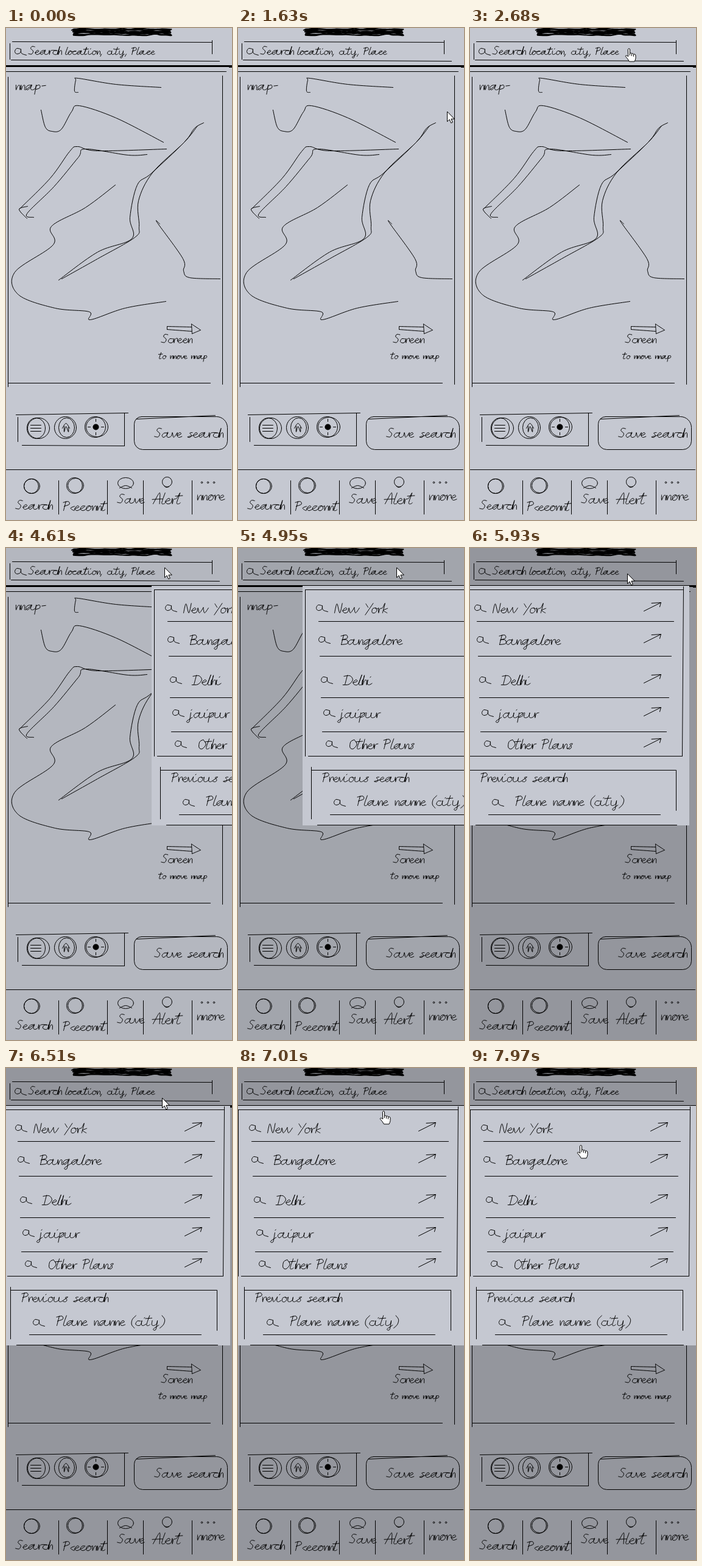
Write an HTML page with a canvas that moves like this. It is 371 px wide and 807 px high and loops after 8 s.

```html
<!DOCTYPE html>
<html lang="en">
<head>
<meta charset="utf-8">
<title>Map search wireframe</title>
<style>
html, body { margin: 0; width: 100%; height: 100%; overflow: hidden; background: #c5c8d1; }
canvas { display: block; }
</style>
</head>
<body>
<canvas id="stage" width="371" height="807"></canvas>
<script>
const ctx = document.getElementById('stage').getContext('2d');
const W = 371, H = 807, LOOP = 8000;
const PAPER = '#c5c8d1';

// Handwriting: a few pen movements, in tenths of the x-height, y upwards.
// Each is [advance, points]; "/" lifts the pen.
const MOVES = {
  bowl: [8, '8,9 3,9 0,4 3,0 8,6 9,10'],
  cup: [8, '0,10 0,2 3,0 7,3'],
  ring: [10, '5,10 1,8 1,1 5,0 8,5 5,10 9,8'],
  curl: [9, '7,9 2,9 0,3 4,0 8,2'],
  eye: [9, '0,4 6,7 4,10 0,5 3,0 8,2'],
  arch: [8, '0,10 1,0 3,8 6,9 7,0'],
  shoulder: [7, '0,10 1,0 2,8 6,10'],
  vee: [8, '0,10 3,0 8,10'],
  ess: [8, '6,10 2,9 5,4 3,0 -1,1'],
  loop: [5, '3,20 0,2 3,0 5,2'],
  hook: [5, '0,10 -1,-8 -5,-7 3,1'],
  stem: [0, '2,19 0,0'],
  leg: [0, '0,10 -1,-9/'],
  belly: [8, '0,8 5,10 6,4 0,1'],
  kick: [8, '/7,9 1,5 7,0'],
  bar: [3, '/-8,14 2,15/'],
  dot: [0, '/-5,15 -4,16/'],
  gate: [10, '/-2,17 6,19 8,13 0,9/'],
  seat: [0, '/-9,10 -2,9 -1,2 -10,0/'],
  sail: [12, '/-3,17 6,18 11,10 6,1 -3,0/'],
  snake: [10, '8,18 3,19 1,14 6,8 4,1 -2,2/'],
  zigzag: [12, '0,0 2,18 8,0 10,19/'],
  fork: [10, '0,18 4,11/11,19 1,-4/'],
  tent: [12, '0,0 6,18 8,18 9,0/-2,8 12,9/'],
  hoop: [12, '6,18 1,14 1,3 6,0 11,9 6,18/'],
  open: [6, '/5,20 0,12 0,2 5,-5/'],
  close: [6, '/1,20 6,12 5,2 0,-5/'],
  comma: [5, '/2,1 0,-5/'],
  dash: [6, '/1,8 7,9/'],
  space: [9, '/']
};

const LETTERS = {
  a: 'bowl cup', c: 'curl', e: 'eye', f: 'loop bar', g: 'bowl hook', h: 'stem arch',
  i: 'cup dot', j: 'hook dot', k: 'stem kick', l: 'loop', m: 'arch arch', n: 'arch',
  o: 'ring', p: 'leg belly', r: 'shoulder', s: 'ess', t: 'loop bar', u: 'cup cup',
  v: 'vee', w: 'vee vee', y: 'cup hook', A: 'tent', B: 'stem gate seat', D: 'stem sail',
  N: 'zigzag', O: 'hoop', P: 'stem gate', R: 'stem gate kick', S: 'snake', Y: 'fork',
  '(': 'open', ')': 'close', ',': 'comma', '-': 'dash', ' ': 'space'
};

const parse = text => text.trim().split(/\s+/).map(p => p.split(',').map(Number));

class Sketch {
  constructor() { this.path = new Path2D(); }

  // Smooth curve through the given points.
  curve(p) {
    const at = i => p[Math.max(0, Math.min(p.length - 1, i))];
    const mid = (i, k, axis) => at(i)[axis] + k * (at(i + 1)[axis] - at(i - 1)[axis]) / 6;
    this.path.moveTo(...p[0]);
    for (let i = 0; i < p.length - 1; i++) {
      this.path.bezierCurveTo(mid(i, 1, 0), mid(i, 1, 1), mid(i + 1, -1, 0), mid(i + 1, -1, 1), ...p[i + 1]);
    }
    return this;
  }

  pen(text, dx = 0, dy = 0) {
    for (const part of text.split('/')) this.curve(parse(part).map(([x, y]) => [x + dx, y + dy]));
    return this;
  }

  write(text, x, y, size) {
    const unit = size / 10, wide = 1.3, slant = .12;
    let points = [], left = x;
    const lift = () => {
      if (points.length > 1) this.curve(points);
      points = [];
    };
    for (const letter of text) {
      for (const name of LETTERS[letter].split(' ')) {
        const [advance, move] = MOVES[name];
        move.split('/').forEach((part, i) => {
          if (i) lift();
          if (!part) return;
          for (const [u, v] of parse(part)) {
            points.push([left + (u * wide + v * slant) * unit, y - v * unit]);
          }
        });
        left += advance * wide * unit;
      }
    }
    lift();
    return this;
  }

  line(x1, y1, x2, y2) {
    this.path.moveTo(x1, y1);
    this.path.lineTo(x2, y2);
    return this;
  }

  ring(x, y, rx, ry = rx) {
    this.path.moveTo(x + rx, y);
    this.path.ellipse(x, y, rx, ry, 0, 0, Math.PI * 2);
    return this;
  }

  box(x, y, w, h, r) {
    this.path.roundRect(x, y, w, h, r);
    return this;
  }

  lens(x, y) { return this.pen('9,1 3,0 0,5 3,9 9,7 10,1 11,8 19,11', x, y); }

  arrow(x, y, w, h) {
    return this.line(x, y + h, x + w, y).line(x + w * .45, y + 1, x + w, y).line(x + w, y, x + w - 2, y + 7);
  }

  draw() {
    ctx.strokeStyle = '#000';
    ctx.lineWidth = 1;
    ctx.stroke(this.path);
  }
}

function drawSearchBar(s) {
  s.line(10, 22, 338, 23).line(338, 20, 338, 42).line(6, 25, 6, 51).line(8, 52, 350, 54);
  s.lens(14, 33).write('Search', 38, 43, 7).write('location, city, Place', 97, 43, 6);
}

function drawMap(s) {
  s.line(0, 71, 361, 71).line(3, 80, 3, 588).line(355, 78, 355, 584).line(3, 582, 335, 582);
  s.write('map-', 15, 101, 8);
  // Top road and river.
  s.pen('118,105 112,103 114,85 118,82 180,92 254,97')
   .pen('57,134 64,162 75,169 90,166 107,137 120,127 180,147 258,187');
  // Forked road with an arrow end.
  s.pen('263,198 150,201 117,194 104,202 72,246 21,297 / 35,292 21,297 34,312')
   .pen('231,207 200,208 130,198 118,212 78,260 34,304 45,310');
  // Both sides of the diagonal road.
  s.pen('324,155 309,164 292,187 238,238 215,257 203,310 206,345 150,367 86,413')
   .pen('314,160 292,187 240,237 217,283 218,325 211,343 150,378 91,411');
  // Lake shore.
  s.pen('179,257 130,294 74,325 77,355 14,400 20,437 80,459 136,465 138,478 195,459 262,448')
   .pen('252,321 248,319 290,378 291,398 301,409 351,411');
  s.pen('304,490 264,489 / 264,489 264,494 / 264,494 304,497 / 304,485 319,495 / 319,495 305,501 / 304,485 305,501');
  s.write('Screen', 256, 516, 7.4).write('to move map', 251, 542, 5.1);
}

function drawTools(s) {
  s.line(16, 634, 200, 631).line(19, 638, 19, 678).line(26, 684, 194, 685).line(194, 631, 194, 685);
  s.ring(49, 656, 15, 17).ring(53, 656, 18, 17)
   .ring(97, 655, 18).ring(99, 655, 13, 16)
   .ring(146, 654, 17).ring(149, 654, 18, 16);
  for (let y = 651; y <= 661; y += 5) s.line(40, y, 57, y);
  s.pen('92,656 98,648 104,656 / 95,653 95,662 98,653 102,662 102,654');
  for (let i = 0; i < 4; i++) {
    const cos = Math.cos(i * Math.PI / 2), sin = Math.sin(i * Math.PI / 2);
    s.line(147 + cos * 9, 654 + sin * 9, 147 + cos * 13, 654 + sin * 13);
  }
  s.box(210, 637, 153, 54, [12, 18, 14, 14]).line(214, 641, 343, 635);
  s.write('Save search', 245, 671, 7.9);
}

function drawNav(s) {
  s.line(0, 724, 369, 724);
  [86, 166, 225, 305].forEach(x => s.line(x, 742, x, 797));
  s.ring(42, 751, 13, 12).ring(41, 751, 12)
   .ring(112, 750, 13).ring(114, 750, 13, 12)
   .ring(196, 746, 13, 9).pen('186,754 196,750 206,754')
   .ring(264, 744, 8).pen('259,750 262,753 267,752');
  for (let x = 321; x <= 341; x += 10) s.ring(x, 745, 1.3);
  s.write('Search', 17, 789, 7.8).write('Reconnf', 94, 791, 7.8).write('Save', 184, 779, 7.8)
   .write('Alert', 241, 780, 9).write('more', 313, 774, 8.5);
}

// Label, its left edge and baseline, and the rule below it.
const ROWS = [
  ['New York', 48, 106, 120], ['Bangalore', 59, 158, 177], ['Delhi', 65, 224, 245],
  ['jaipur', 59, 278, 301], ['Other Plans', 72, 329, 341]
];

function drawResults(s) {
  s.line(0, 68, 361, 68).line(0, 68, 0, 341).line(361, 63, 359, 341);
  ROWS.forEach(([label, x, y, rule], i) => {
    s.write(label, x, y, 8.3).lens(18 + i * 4, y - 13).arrow(296, y - 17, 28, 14);
    s.line(i < 4 ? 22 + i * 2 : 5, rule, i < 4 ? 345 - i * 4 : 359, rule);
  });
  s.line(10, 359, 10, 444).line(10, 364, 349, 364).line(349, 365, 349, 430)
   .line(41, 437, 323, 437).line(20, 454, 350, 454);
  s.write('Previous search', 29, 383, 7.7).lens(47, 412).write('Plane name (city)', 86, 422, 8.2);
}

// Crossed-out title: long strokes back and forth with a shaky hand.
function scribble() {
  let seed = 7;
  const random = () => (seed = seed * 16807 % 2147483647) / 2147483647;
  const s = new Sketch(), points = [];
  for (let pass = 0; pass < 12; pass++) {
    for (let i = 0; i <= 12; i++) {
      const u = pass % 2 ? 1 - i / 12 : i / 12;
      points.push([111 + u * 157 + random() * 4 - 2, pass * .9 + random() * 3 - .5]);
    }
  }
  return s.curve(points).path;
}

const page = new Sketch(), results = new Sketch(), crossedOut = scribble();
[drawSearchBar, drawMap, drawTools, drawNav].forEach(part => part(page));
drawResults(results);

const arrowShape = new Path2D('M0 0V16L3.7 12.6 6.2 18.3 8.8 17.2 6.4 11.7H11.5Z');
const handShape = new Path2D('M5 2.5Q6.5-.5 8 2.5V9Q9.5 7.5 11 9.5 12.5 8.3 14 10.5 17 9.5 17.5 12.5V17Q17 20 15.5 22.5H7Q5 18.5 .8 14 1 11 5 14Z');
const knuckles = new Path2D('M8 9V12M11 10V13M14 11V14');

// Time and place of the pointer tip.
const TRACK = [
  [1430, 364, 166], [2210, 273, 43], [2660, 260, 32], [4950, 260, 32],
  [6500, 256, 49], [7470, 221, 88], [7920, 181, 125]
];

function pointerAt(t) {
  const next = TRACK.findIndex(k => k[0] > t);
  if (next < 1) return TRACK.at(next).slice(1);
  const [t0, x0, y0] = TRACK[next - 1], [t1, x1, y1] = TRACK[next];
  const u = (t - t0) / (t1 - t0);
  return [x0 + (x1 - x0) * u, y0 + (y1 - y0) * u];
}

// Remaining share of the slide: a gentle damped spring from 1 to 0.
function spring(ms) {
  if (ms <= 0) return 1;
  const s = ms / 1000, zeta = .75, omega = 2.95, k = Math.sqrt(1 - zeta * zeta);
  const a = omega * k * s;
  return Math.exp(-zeta * omega * s) * (Math.cos(a) + zeta / k * Math.sin(a));
}

function drawPage() {
  ctx.fillStyle = PAPER;
  ctx.fillRect(0, 0, W, H);
  ctx.save();
  ctx.translate(.5, .5);
  page.draw();
  ctx.lineWidth = 1.8;
  ctx.stroke(crossedOut);
  ctx.restore();
  ctx.fillStyle = '#000';
  ctx.fillRect(0, 61, W, 3);
  ctx.fillRect(366, 61, 5, 4);
  ctx.beginPath();
  ctx.arc(147.5, 654.5, 5, 0, 7);
  ctx.fill();
}

function drawPanel(rest) {
  ctx.fillStyle = `rgba(0,0,0,${.25 * Math.min(1, 1 - rest)})`;
  ctx.fillRect(0, 0, W, H);
  ctx.save();
  ctx.translate(Math.round(375 * rest), 0);
  ctx.fillStyle = PAPER;
  ctx.fillRect(-4, 62, 375, 393);
  ctx.translate(.5, .5);
  results.draw();
  ctx.restore();
}

function drawPointer(t, time) {
  const [x, y] = pointerAt(t);
  const hand = time < 4230 ? y < 57 : y > 62;
  const shape = hand ? handShape : arrowShape;
  ctx.save();
  ctx.translate(Math.round(hand ? x - 6 : x) + .5, Math.round(y) + .5);
  ctx.lineWidth = 1;
  ctx.fillStyle = '#fff';
  ctx.fill(shape);
  ctx.stroke(shape);
  if (hand) ctx.stroke(knuckles);
  ctx.restore();
}

function render(time) {
  const step = 61.2;
  const t = 4610 + Math.floor((time - 4610) / step) * step;
  ctx.lineJoin = ctx.lineCap = 'round';
  drawPage();
  if (time >= 4230) drawPanel(spring(t - 4230));
  if (time >= 4050 && time < 4230) {
    ctx.fillStyle = 'rgba(90,95,110,.3)';
    ctx.beginPath();
    ctx.arc(260, 32, 12, 0, 7);
    ctx.fill();
  }
  if (time >= 1430) drawPointer(t, time);
}

const start = performance.now();
function tick() {
  render((performance.now() - start) % LOOP);
  requestAnimationFrame(tick);
}
tick();
</script>
</body>
</html>
```
